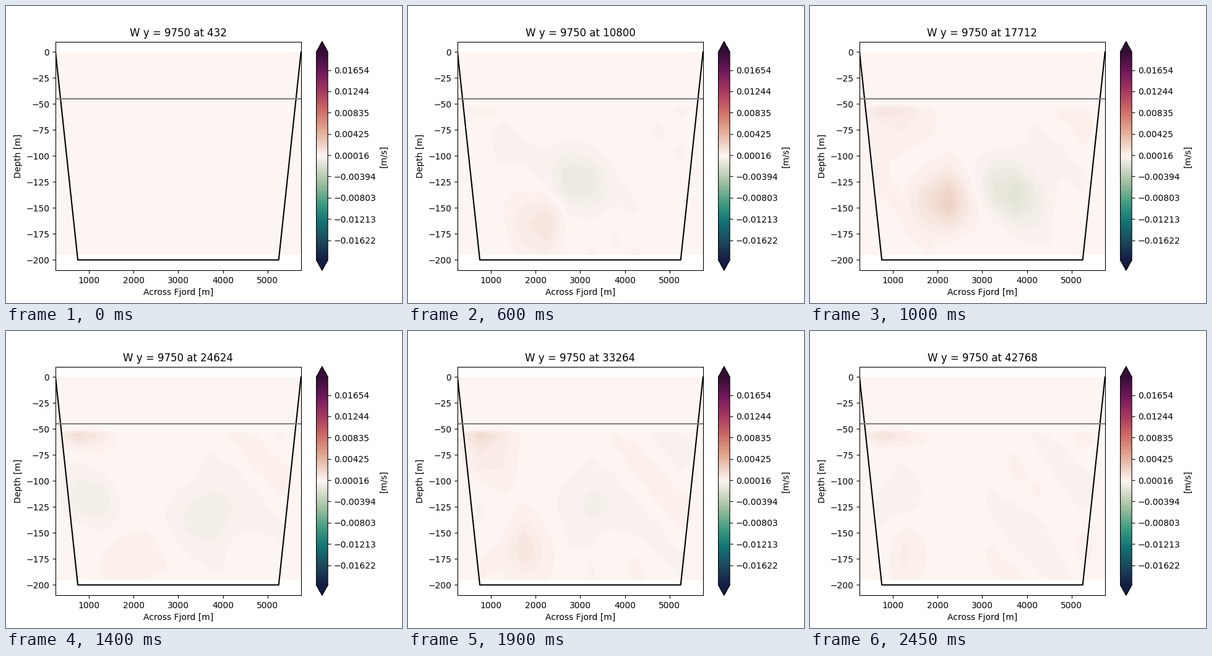
A matplotlib script for the animation above (2500 ms loop, 640x480 px).

```python
import numpy as np
import matplotlib.pyplot as plt
from matplotlib.animation import FuncAnimation
from matplotlib.colors import LinearSegmentedColormap

FRAMES, INTERVAL = 50, 50
LEVELS = np.linspace(-0.02, 0.02, 128)
STEP = LEVELS[1] - LEVELS[0]

x = np.arange(250, 5751, 500)
z = np.r_[-0.5, -50, -55, -60, np.arange(-65, -196, -10)]
X, Z = np.meshgrid(x, z)
WATER = (Z < -51) & (X > 250) & (X < 5750)

COLD = [(20, 29, 67), (28, 72, 93), (18, 115, 117),
        (63, 156, 129), (153, 189, 156), (223, 225, 211)]
WARM = [(241, 218, 206), (224, 160, 137), (203, 101, 99),
        (164, 54, 96), (111, 23, 91), (51, 13, 53)]

# Key points of the two large rolls: position across the fjord and strength
TIMES = [0, 7, 16, 20, 28, 38, 49]
SINK_X = [1000, 1150, 4350, 3700, 3700, 3200, 4400]
SINK_POWER = [0, -4.5, -4, -5.2, -3, -2.2, -0.9]
RISE_X = [1250, 1250, 2900, 2150, 2000, 1750, 1300]
RISE_POWER = [0, 4.5, 3.6, 8, 1.8, 3.6, 2]


def make_cmap():
    spots = np.r_[np.arange(6) / 11, 0.5, np.arange(6, 12) / 11]
    colors = np.array(COLD + [(254, 245, 243)] + WARM) / 255
    return LinearSegmentedColormap.from_list("flow", list(zip(spots, colors)), N=512)


def bell(cx, cz, sx, sz):
    return np.exp(-((X - cx) / sx) ** 2 / 2 - ((Z - cz) / sz) ** 2 / 2)


def roll_width(cx):
    return 150 + 0.09 * cx


def sinking(t):
    """Downward roll whose axis tilts deeper across the fjord."""
    cx = np.interp(t, TIMES, SINK_X)
    return np.interp(t, TIMES, SINK_POWER) * bell(cx, -100 - 0.009 * X, roll_width(cx), 21)


def rising(t):
    """Upward roll that reaches higher the stronger it is."""
    cx = np.interp(t, TIMES, RISE_X)
    power = np.interp(t, TIMES, RISE_POWER)
    return power * bell(cx, -183 + 5 * power, roll_width(cx), 19)


def plume(t):
    """Pulsing upwelling just under the interface."""
    return (3.2 + 1.2 * np.cos(2 * np.pi * (t - 7) / 10.4)) * bell(750, -56, 380, 6)


def bobbing(t):
    """Fading cell at the left wall: sinks when deep, rises when shallow."""
    swing = np.cos(2 * np.pi * (t - 28) / 20)
    return -3.6 * (1 - t / 90) * swing * bell(1000, -97 - 23 * swing, 380, 17)


rng = np.random.default_rng(4)
EDDIES = rng.uniform([1, 0.5, -1, 0], [3, 2, 1, 1], (4, 4))


def eddies(t):
    """Faint wandering background motion."""
    return sum(0.3 * np.cos(2 * np.pi * (kx * X / 5500 + kz * Z / 150 + speed * t / 30 + phase))
               for kx, kz, speed, phase in EDDIES)


def velocity(t):
    onset = min(t / 7, 1)
    w = sinking(t) + rising(t) + onset * (plume(t) + bobbing(t) + eddies(t))
    return w * WATER * STEP


fig, ax = plt.subplots(figsize=(6.4, 4.8), dpi=100)
cmap = make_cmap()


def fill(w):
    return ax.contourf(X, Z, w, levels=LEVELS, cmap=cmap, extend="both", zorder=0.5)


base = fill(velocity(0))
fig.colorbar(base, ax=ax, label="[m/s]")
ax.plot([250, 750, 5250, 5750], [0, -200, -200, 0], color="black")
ax.axhline(-45, color="gray")
ax.set(xlim=(250, 5750), ylim=(-210, 10),
       xlabel="Across Fjord [m]", ylabel="Depth [m]")
title = ax.set_title("")
layers = []


def update(i):
    while layers:
        layers.pop().remove()
    layers.append(fill(velocity(i)))
    title.set_text(f"W y = 9750 at {432 + 864 * i}")
    return layers + [title]


anim = FuncAnimation(fig, update, frames=FRAMES, interval=INTERVAL,
                     init_func=lambda: update(0), repeat=True, repeat_delay=0)
plt.show()
```
